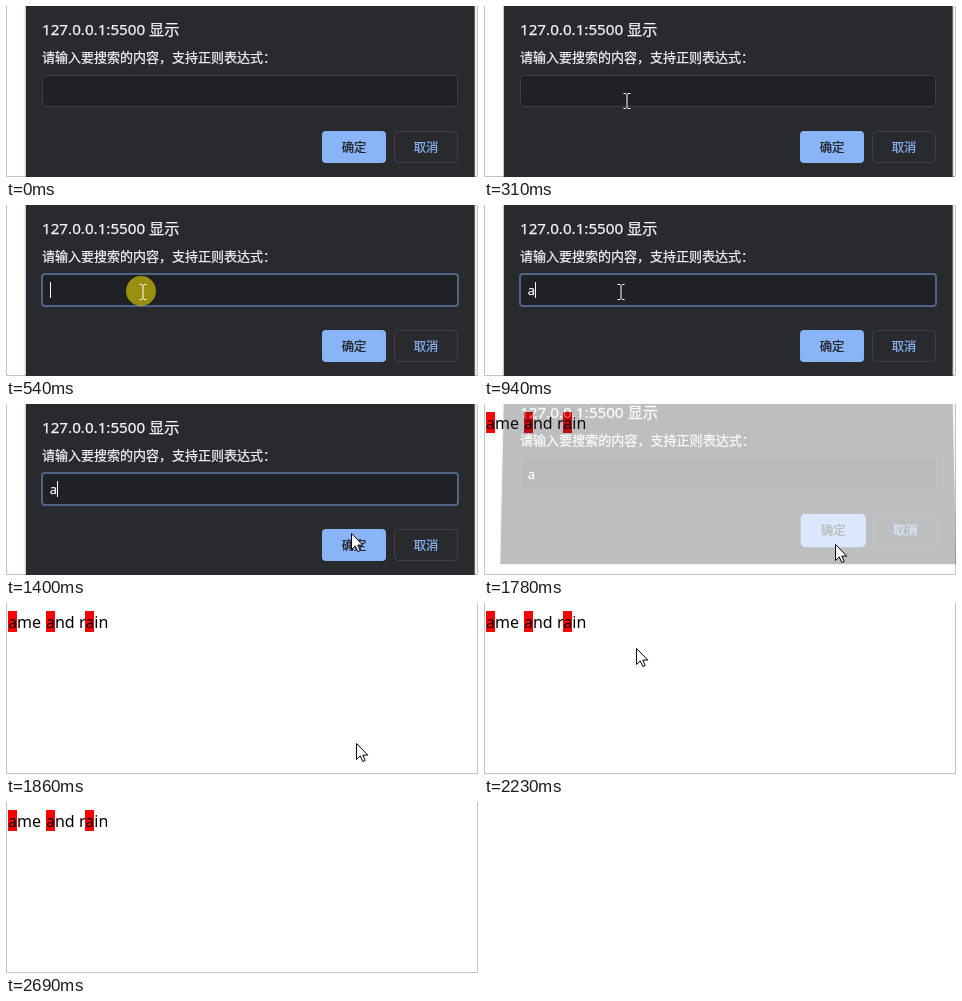
Recreate the animation shown at these times as an HTML page. Size 472 by 171 pixels, loop 3170 ms.

```html
<!DOCTYPE html>
<html lang="zh">
<head>
<meta charset="utf-8">
<title>搜索</title>
<style>
html, body { margin: 0; width: 100%; height: 100%; overflow: hidden; background: #fff; }
svg { display: block; width: 472px; height: 171px; }
text { font-family: "Noto Sans", "Noto Sans CJK SC", "Noto Sans CJK", sans-serif; white-space: pre; }
#content text { fill: currentColor; stroke: currentColor; stroke-width: .25px; }
#panel { filter: drop-shadow(0 0 1px rgba(0, 0, 0, .6)); }
.label { font-size: 12.3px; text-anchor: middle; }
</style>
</head>
<body>
<svg viewBox="0 0 472 171" xmlns="http://www.w3.org/2000/svg">
  <rect width="472" height="171" fill="#fff"/>
  <path d="M.5 0V170.5H471.5V0" fill="none" stroke="#c3c3c3"/>

  <g id="result" font-size="16">
    <path d="M2 8h9v21h-9zM40 8h9v21h-9zM79 8h9v21h-9z" fill="#f00"/>
    <text x="2" y="25">ame</text>
    <text x="40" y="25">and</text>
    <text x="73" y="25">rain</text>
  </g>

  <g id="dialog">
    <path id="panel" fill="#292a2d"/>
    <g id="content" font-size="13" color="#f1f3f4">
      <text x="36" y="28.5" font-size="15.2">127.0.0.1:5500 显示</text>
      <text x="36" y="55.7">请输入要搜索的内容，支持正则表达式：</text>
      <rect id="field" x="36.5" y="69.5" width="415" height="31" rx="3" fill="#202124"/>
      <text id="typed" x="43.7" y="90">a</text>
      <rect id="caret" y="77" width="1" height="16" fill="#fff"/>
      <rect id="confirm" x="316" y="125" width="64" height="32" rx="4" fill="#8ab4f8"/>
      <text class="label" x="348" y="145.7" color="#202124">确定</text>
      <rect x="388.5" y="125.5" width="63" height="31" rx="4" fill="none" stroke="#3d4044"/>
      <text class="label" x="420" y="145.7" color="#8ab4f8">取消</text>
    </g>
  </g>

  <circle id="click" r="15" fill="#ffeb00" fill-opacity=".55"/>
  <path id="arrow" d="M.5.5v16l3.7-3.6 2.6 5.6 2.4-1-2.4-5.4h5z" fill="#fff" stroke="#000"/>
  <path id="beam" d="M-3.5-7.5h2.5l1 1 1-1h2.5M0-6.5v13M-3.5 7.5h2.5l1-1 1 1h2.5" fill="none"/>
</svg>
<script>
const LOOP = 3170;
const $ = id => document.getElementById(id);
const set = (id, attrs) => {
  for (const k in attrs) $(id).setAttribute(k, attrs[k]);
};
const show = (id, on) => set(id, { visibility: on ? "visible" : "hidden" });
const at = (list, t) => list.filter(s => s[0] <= t).pop();
const within = (t, from, to) => t >= from && t < to;

// time, pointer shape, x, y
const pointer = [
  [0, ""],
  [150, "arrow", 176, 141],
  [230, "arrow", 156, 117],
  [310, "beam", 143, 95],
  [390, "beam", 138, 88],
  [460, "beam", 137, 87],
  [1170, "beam", 165, 93],
  [1250, "arrow", 250, 110],
  [1320, "arrow", 322, 124],
  [1400, "arrow", 345, 129],
  [1490, "arrow", 350, 135],
  [1560, "arrow", 352, 139],
  [1780, "arrow", 351, 140],
  [1860, "arrow", 350, 140],
  [2000, "arrow", 338, 134],
  [2080, "arrow", 290, 111],
  [2160, "arrow", 215, 75],
  [2230, "arrow", 152, 45],
  [2310, "arrow", 116, 30],
  [2390, "beam", 98, 21],
  [2540, "arrow", 99, 58],
  [2610, "arrow", 105, 150],
  [2690, ""]
];

// time, opacity, shift, scale, lower-edge spread, bottom
const closing = [
  [0, 1, 0, 1, 0, 173],
  [1630, 0.995, -1, 1, 0.3, 172],
  [1700, 0.98, -5.2, 1.002, 1.5, 168],
  [1780, 0.3, -15, 1.004, 3.5, 160],
  [1860, 0, -15, 1.004, 3.5, 160]
];

function draw(t) {
  const [, opacity, shift, scale, spread, bottom] = at(closing, t);
  show("result", t >= 1700);
  set("dialog", { opacity });
  set("panel", { d: `M20 -4L${20 - spread} ${bottom}H${468.5 + spread}L468.5 -4z` });
  set("content", { transform: `translate(${36 - 36 * scale} ${shift}) scale(${scale})` });

  const focus = within(t, 460, 1560);
  const hasText = t >= 940;
  set("field", {
    x: focus ? 36 : 36.5, y: focus ? 69 : 69.5,
    width: focus ? 416 : 415, height: focus ? 32 : 31,
    stroke: focus ? "#4f6384" : "#3b3d41", "stroke-width": focus ? 2 : 1
  });
  show("typed", hasText);
  show("caret", within(t, 460, 1490));
  set("caret", { x: hasText ? 51 : 44 });
  set("confirm", { stroke: t >= 1560 ? "#8ab4f8" : "none" });

  const [, shape, x, y] = at(pointer, t);
  for (const id of ["arrow", "beam"]) {
    show(id, id === shape);
    if (id === shape) set(id, { transform: `translate(${x} ${y})` });
  }
  set("beam", { stroke: t < 1860 ? "#fff" : "#000" });

  const fieldClick = within(t, 460, 700);
  show("click", fieldClick || within(t, 1560, 1630));
  set("click", fieldClick ? { cx: 135, cy: 86 } : { cx: 352, cy: 139 });
}

const start = performance.now();
function tick() {
  draw((performance.now() - start) % LOOP);
  requestAnimationFrame(tick);
}
tick();
</script>
</body>
</html>
```
